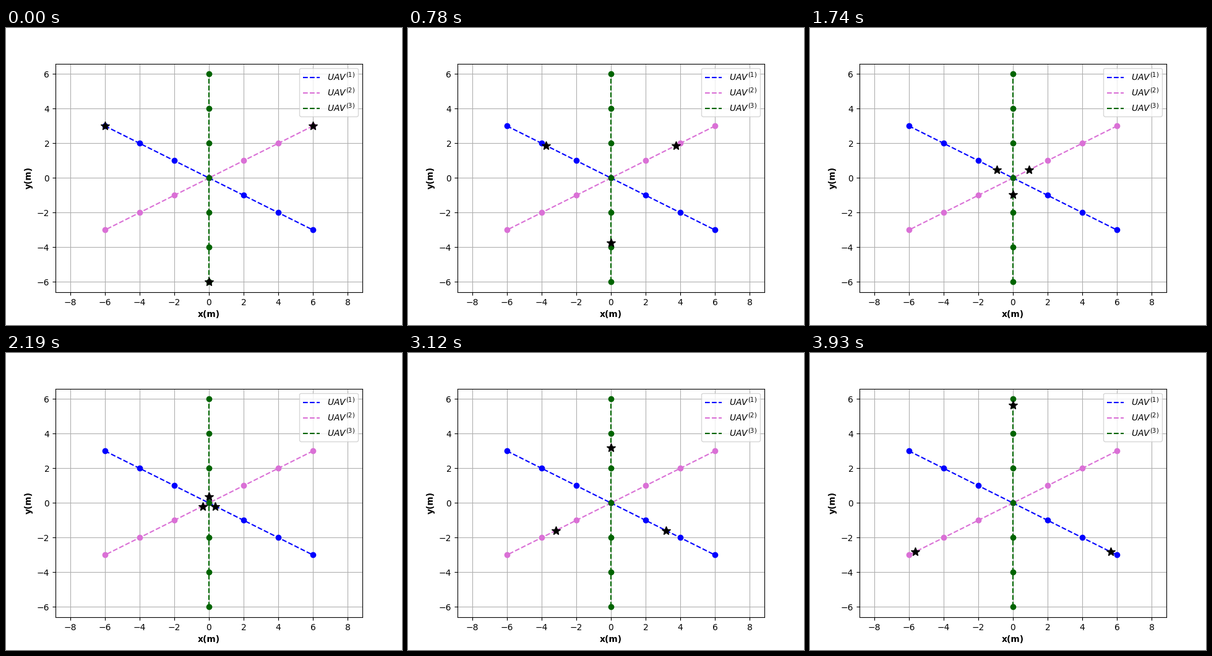
Animation of 640x480 px, one loop 3.96 s. Source, as a matplotlib script:

```python
import numpy as np
import matplotlib.pyplot as plt
from matplotlib.animation import FuncAnimation

FRAMES = 132
STEP_MS = 30
UNIT = 28  # pixels per metre

# start point and colour of each vehicle; every route runs through the origin
ROUTES = [((-6, 3), "blue"), ((6, 3), "orchid"), ((0, -6), "darkgreen")]

# distance flown (pixels along the long axis) at a few moments
KEY_FRAMES = [0, 18, 26, 36, 54, 73, 90, 108, 131]
KEY_DIST = [0, 44.8, 63.4, 88.2, 132, 178.3, 222, 267.6, 326]

fig, ax = plt.subplots(figsize=(6.4, 4.8), dpi=100)
stars = []

for i, (start, color) in enumerate(ROUTES, 1):
    points = np.outer(np.linspace(1, -1, 7), start)
    ax.plot(*points.T, "--", color=color, label=f"$UAV^{{({i})}}$")
    ax.plot(*points.T, "o", color=color)

for start, _ in ROUTES:
    star, = ax.plot(*[[v] for v in start], "*", color="black",
                    markersize=10, zorder=3)
    stars.append(star)

ax.set_ylim(-6.6, 6.6)
ax.set_xlim(-248 / UNIT, 248 / UNIT)
ax.set_xlabel("x(m)", fontweight="bold")
ax.set_ylabel("y(m)", fontweight="bold")
ax.grid(True)
ax.legend(loc="upper right")


def update(n):
    scale = 1 - np.interp(n, KEY_FRAMES, KEY_DIST) / (6 * UNIT)
    for star, ((x, y), _) in zip(stars, ROUTES):
        star.set_data([x * scale], [y * scale])
    return stars


anim = FuncAnimation(fig, update, frames=FRAMES, interval=STEP_MS,
                     repeat=True, repeat_delay=0, blit=False)
plt.show()
```
